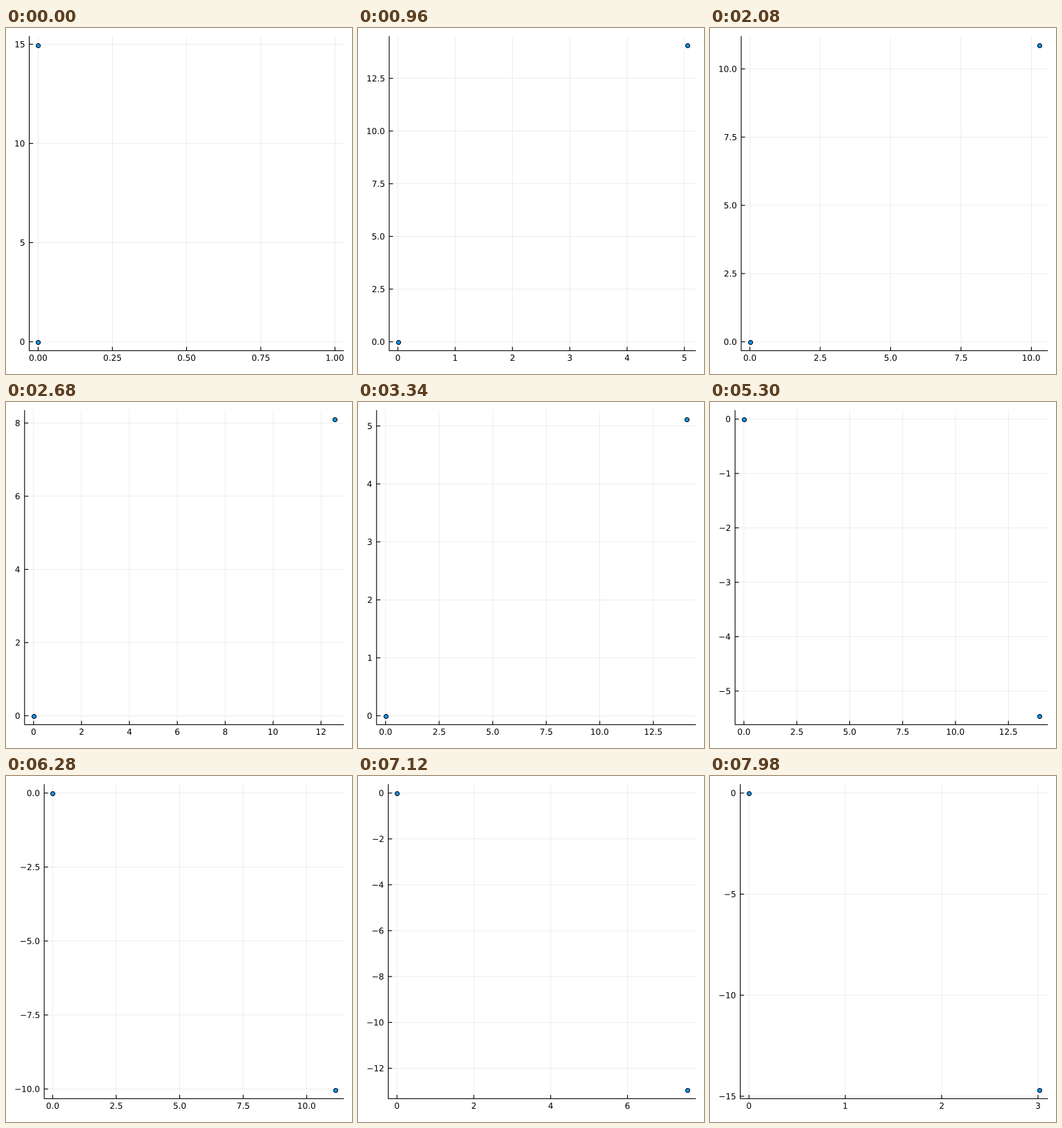
Recreate the animation shown at these times as a matplotlib script. Size 499x499 px, loop 8 s.

```python
import math

import matplotlib.pyplot as plt
from matplotlib.animation import FuncAnimation
from matplotlib.collections import LineCollection, PathCollection
from matplotlib.textpath import TextPath
from matplotlib.transforms import Affine2D

SIZE, DPI = 499, 64
PX = 72 / DPI                              # one pixel in points
TOP, BOTTOM, RIGHT = 11.75, 465.35, 487.3  # plot area, pixels from the top left
FONT, TICK = 12, 5.5

# Planet on a nearly circular orbit, one day per step, in units of 1e10 m
R0, ECC, DAILY = 14.96, 0.0008, math.radians(0.9847)

# Tick steps and how nice each one is
STEPS = ((1, 1.0), (5, 0.9), (2.5, 0.5), (2, 0.7), (3, 0.2))

plt.rcParams["font.family"] = "DejaVu Sans"
fig = plt.figure(figsize=(SIZE / DPI, SIZE / DPI), dpi=DPI, facecolor="white")
ax = fig.add_axes([0, 0, 1, 1])
ax.set_xlim(0, SIZE)
ax.set_ylim(SIZE, 0)
ax.axis("off")


def add_lines(color, width, z):
    lines = LineCollection([], colors=color, linewidths=width * PX,
                           capstyle="butt", zorder=z)
    lines.set_snap(False)
    ax.add_collection(lines, autolim=False)
    return lines


grid = add_lines((0, 0, 0, 0.1), 0.65, 1)
frame = add_lines("black", 1.1, 2)
labels = PathCollection([], facecolors="black", linewidths=0, zorder=3)
labels.set_snap(False)
ax.add_collection(labels, autolim=False)
dots, = ax.plot([], [], "o", ms=6 * PX, mfc="#009AFA", mec="black",
                mew=1.0 * PX, zorder=4, snap=False)

glyphs = {}


def glyph(text):
    """Outline of a label with its ink starting at x = 0, and its width."""
    if text not in glyphs:
        path = TextPath((0, 0), text, size=FONT)
        box = path.get_extents()
        flip = Affine2D().translate(-box.x0, 0).scale(1, -1)
        glyphs[text] = path.transformed(flip), box.width
    return glyphs[text]


def place(text, x, baseline, align):
    path, width = glyph(text)
    return path.transformed(Affine2D().translate(x - align * width, baseline))


def limits(value):
    lo, hi = min(0, value), max(0, value)
    if lo == hi:
        hi = 1
    pad = 0.03 * (hi - lo)
    return lo - pad, hi + pad


def ticks(lo, hi):
    """Best set of 4 to 8 ticks by count, coverage and niceness."""
    span = hi - lo
    order = math.ceil(math.log10(span))
    best, choice = -1, None
    for power in (order, order - 1, order - 2):
        for q, nice in STEPS:
            step = q * 10.0 ** power
            first, last = math.ceil(lo / step), math.floor(hi / step)
            n = last - first + 1
            if not 4 <= n <= 8:
                continue
            score = ((1 - abs(n - 5) / 5) / 4 + nice / 4
                     + 0.5 * span / ((n - 1) * step))
            if score > best + 1e-9:
                best, choice = score, (step, first, last)
    step, first, last = choice
    digits = next(d for d in range(8) if abs(round(step, d) - step) < 1e-9)
    values = [i * step for i in range(first, last + 1)]
    return values, [f"{v:.{digits}f}".replace("-", "\u2212") for v in values]


def day(i):
    """Three steps on successive frames, then a pause, every seven frames."""
    turn, rest = divmod(i + 1, 7)
    return 3 * turn + min(rest, 2) - 1


def planet(n):
    mean = DAILY * n
    angle = mean + 2 * ECC * math.sin(mean)
    r = R0 * (1 + ECC * (1 - math.cos(mean)))
    return r * math.sin(angle), r * math.cos(angle)


def update(i):
    x, y = planet(day(i))
    (x0, x1), (y0, y1) = limits(x), limits(y)
    xs, xtext = ticks(x0, x1)
    ys, ytext = ticks(y0, y1)
    left = 20.4 + max(glyph(t)[1] for t in ytext)

    def px(v):
        return left + (v - x0) / (x1 - x0) * (RIGHT - left)

    def py(v):
        return BOTTOM - (v - y0) / (y1 - y0) * (BOTTOM - TOP)

    cols, rows = [px(v) for v in xs], [py(v) for v in ys]
    grid.set_segments([[(c, TOP), (c, BOTTOM)] for c in cols]
                      + [[(left, r), (RIGHT, r)] for r in rows])
    frame.set_segments([[(left, TOP), (left, BOTTOM), (RIGHT, BOTTOM)]]
                       + [[(c, BOTTOM), (c, BOTTOM - TICK)] for c in cols]
                       + [[(left, r), (left + TICK, r)] for r in rows])
    labels.set_paths([place(t, c, 479.9, 0.5) for t, c in zip(xtext, cols)]
                     + [place(t, left - 7, r + 0.364 * FONT, 1)
                        for t, r in zip(ytext, rows)])
    dots.set_data([px(0), px(x)], [py(0), py(y)])
    return grid, frame, labels, dots


anim = FuncAnimation(fig, update, frames=400, interval=20, repeat=True,
                     repeat_delay=0, blit=False)
plt.show()
```
